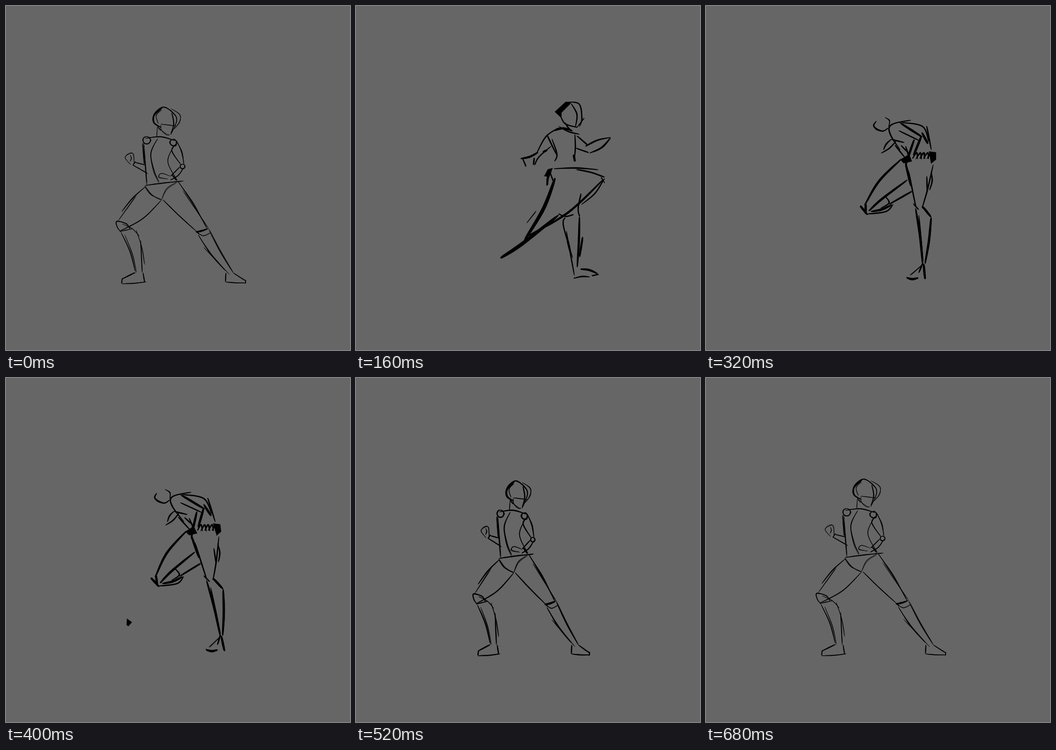
Animation, 748 px wide and 748 px high, one loop 880 ms. Source, as an HTML page with a canvas:

```html
<!DOCTYPE html>
<html lang="en">
<head>
<meta charset="utf-8">
<title>Spinning kick</title>
<style>
html, body { margin: 0; width: 100%; height: 100%; overflow: hidden; background: #666; }
canvas { display: block; width: 748px; height: 748px; }
</style>
</head>
<body>
<canvas id="stage" width="748" height="748"></canvas>
<script>
const FLOOR = 604, LOOP = 880;
let shapes, warp, weight, seed;

function random() {
  seed = seed * 16807 % 2147483647;
  return seed / 2147483647;
}

function spline(p) {
  const out = [];
  for (let i = 0; i < p.length - 1; i++) {
    const a = p[i - 1] || p[i], b = p[i], c = p[i + 1], d = p[i + 2] || c;
    for (let t = 0; t < 1; t += 0.125) {
      out.push([0, 1].map(k => b[k] + t / 2 * (c[k] - a[k] +
        t * (2 * a[k] - 5 * b[k] + 4 * c[k] - d[k] + t * (3 * (b[k] - c[k]) + d[k] - a[k])))));
    }
  }
  return [...out, p[p.length - 1]];
}

function addShape(pts) {
  const path = new Path2D();
  pts.forEach(([x, y]) => path.lineTo(x, y));
  path.closePath();
  shapes.push(path);
}

// A line that thins out towards both ends.
function brush(pts, width) {
  const mid = spline(pts), n = mid.length - 1, left = [], right = [];
  mid.forEach(([x, y], i) => {
    const a = mid[Math.max(0, i - 1)], b = mid[Math.min(n, i + 1)];
    const dx = b[0] - a[0], dy = b[1] - a[1], len = Math.hypot(dx, dy) || 1;
    const r = width / 2 * (0.3 + 0.7 * Math.sqrt(Math.max(0, Math.sin(Math.PI * i / n)))) / len;
    left.push([x - dy * r, y + dx * r]);
    right.unshift([x + dy * r, y - dx * r]);
  });
  addShape(left.concat(right));
}

const pairs = v => Array.from({ length: v.length >> 1 }, (_, i) => [v[2 * i], v[2 * i + 1]]);

// Takes x, y pairs; an odd last value bows the line to its right-hand side.
function stroke(size, v) {
  let pts = pairs(v);
  if (v.length % 2) {
    const [[x1, y1], [x2, y2]] = pts, bend = v[4] / Math.hypot(x2 - x1, y2 - y1);
    pts.splice(1, 0, [(x1 + x2) / 2 - (y2 - y1) * bend, (y1 + y2) / 2 + (x2 - x1) * bend]);
  }
  pts = pts.map(warp);
  brush(pts, size * weight);
  // A lighter second pass gives the sketchy double line.
  brush(pts.map(([x, y]) => [x + random() * 3 - 1.5, y + random() * 3 - 1.5]), size * weight * 0.5);
}

const fine = (...v) => stroke(0.65, v);
const line = (...v) => stroke(1, v);
const bold = (...v) => stroke(1.7, v);
const heavy = (...v) => stroke(2.8, v);
const blob = (...v) => addShape(pairs(v).map(warp));

function ring(cx, cy, rx, ry = rx) {
  const pts = Array.from({ length: 11 }, (_, i) =>
    [cx + rx * Math.cos(i * 0.66 - 2), cy + ry * Math.sin(i * 0.66 - 2)]);
  stroke(1.1, pts.flat());
}

function stanceBody() {
  bold(340, 221, 322, 238, 322, 254, 337, 264);
  line(322, 254, 322, 235, 342, 220, 364, 233, 371, 250, 358, 280);
  fine(358, 223, 378, 236, 377, 252, 365, 268);
  fine(338, 225, 331, 256, 8);
  fine(337, 257, 370, 261);
  line(360, 232, 359, 278, -5);
  fine(337, 258, 338, 270, 349, 280, 356, 280);
  line(329, 262, 337, 271);
  fine(329, 264, 328, 284);
  line(303, 288, 368, 293, -6);
  ring(306, 292, 8);
  ring(364, 297, 7);
  line(299, 297, 306, 389);
  line(297, 298, 301, 344);
  line(330, 288, 315, 320, 322, 358, 333, 383);
  fine(368, 300, 352, 338, 373, 380);
  line(303, 390, 386, 381, -1);
  line(302, 391, 338, 422, 5);
  fine(371, 383, 338, 421, 7);
}

function stanceArms() {
  line(371, 293, 387, 344, -3);
  line(366, 303, 361, 316, 380, 345);
  ring(384, 349, 5);
  line(386, 352, 357, 379, -4);
  line(378, 350, 358, 370);
  fine(357, 370, 338, 364, 333, 372, 352, 376);
  line(360, 366, 371, 380);
  fine(271, 345, 259, 330, 267, 322, 277, 322, 279, 343);
  fine(270, 324, 270, 338, -3);
  line(276, 347, 281, 338);
  line(281, 340, 304, 346);
  line(276, 346, 308, 364);
}

function stanceLegs() {
  line(303, 393, 252, 447, 3);
  fine(284, 412, 244, 467);
  line(338, 422, 247, 490, -8);
  line(270, 486, 262, 474, 241, 468, 242, 481, 250, 491);
  fine(247, 490, 276, 484);
  fine(253, 474, 290, 500, -4);
  line(250, 492, 281, 577, -4);
  fine(258, 497, 284, 580, -3);
  fine(283, 487, 301, 562, -3);
  line(293, 510, 296, 580);
  line(281, 579, 251, 594);
  line(253, 592, 251, 603);
  line(251, 604, 305, 600, 1);
  line(298, 580, 301, 600);
}

function stanceBackLeg() {
  line(374, 381, 437, 483, -2);
  fine(385, 402, 442, 486);
  line(341, 421, 414, 490, 1);
  bold(413, 492, 439, 484, 1);
  fine(415, 492, 444, 493, 7);
  line(413, 489, 420, 496);
  line(418, 498, 477, 575, 3);
  fine(430, 525, 486, 584);
  line(441, 486, 494, 580, 2);
  line(478, 580, 477, 600);
  line(477, 600, 521, 602, 1);
  line(494, 580, 521, 598);
  line(521, 596, 521, 603);
}

function stance() {
  stanceBody();
  stanceArms();
  stanceLegs();
  stanceBackLeg();
}

function stepBody() {
  blob(432, 230, 456, 208, 468, 211, 447, 232, 447, 244);
  line(456, 209, 485, 213, 491, 245, 486, 262);
  line(445, 240, 455, 256, 480, 264);
  line(468, 212, 477, 263, -8);
  fine(496, 243, 480, 265);
  bold(430, 271, 470, 271, -5);
  line(441, 262, 486, 279, 3);
  line(455, 254, 470, 272, 2);
  line(441, 265, 413, 284, 392, 322);
  line(415, 281, 438, 327);
  line(426, 289, 437, 322, 432, 338);
  line(476, 279, 474, 338, -2);
  bold(473, 323, 476, 338);
}

function stepArms() {
  line(424, 305, 398, 328, 388, 346);
  bold(358, 332, 396, 318, 3);
  line(362, 331, 370, 349);
  line(388, 330, 386, 346);
  bold(406, 318, 416, 313);
  line(480, 282, 504, 302);
  line(498, 305, 553, 286, -4);
  line(554, 287, 508, 320, -6);
  line(478, 309, 506, 319);
}

function stepLegs() {
  line(430, 354, 527, 356, -3);
  line(480, 355, 541, 372, -2);
  fine(533, 372, 541, 385);
  blob(409, 370, 417, 355, 428, 352, 420, 372);
  bold(424, 360, 416, 390, 3);
  line(422, 362, 430, 384);
  heavy(433, 374, 408, 440, 366, 510);
  heavy(314, 548, 360, 518, 440, 455);
  bold(370, 502, 460, 450, 537, 378);
  line(540, 375, 490, 432, -6);
  fine(371, 472, 392, 446);
  line(489, 407, 483, 440, 486, 458);
  line(440, 452, 473, 453, 5);
  line(455, 460, 451, 478, 471, 548);
  bold(459, 505, 466, 535);
  line(457, 490, 475, 586);
  bold(486, 458, 481, 568, -1);
  bold(493, 502, 486, 545);
  line(473, 592, 508, 589, -2);
  bold(488, 572, 525, 582, -3);
  line(513, 587, 528, 583);
}

function step() {
  stepBody();
  stepArms();
  stepLegs();
}

function kickBody() {
  line(442, 187, 418, 202, 420, 222, 438, 230);
  fine(409, 205, 437, 234, 8);
  fine(440, 191, 428, 205, 435, 222);
  fine(447, 195, 467, 196, 470, 207);
  line(469, 207, 454, 240);
  fine(383, 278, 405, 244, -3);
  bold(408, 253, 388, 290, 376, 332);
  bold(399, 262, 383, 302);
  line(430, 249, 413, 275, 408, 305);
  line(443, 250, 446, 270, 402, 318, 380, 347);
  line(457, 250, 465, 282);
  line(413, 285, 476, 290, -6);
  line(410, 307, 470, 293);
  heavy(466, 296, 488, 296);
  line(376, 347, 410, 322);
  line(376, 346, 418, 396);
  line(384, 341, 407, 353, 412, 390);
}

function kickSweep() {
  line(505, 332, 558, 332);
  line(550, 335, 533, 370, -3);
  heavy(460, 437, 520, 392, 548, 352);
  bold(489, 299, 580, 283, 697, 298);
  line(693, 296, 635, 353, 558, 403);
  heavy(361, 499, 435, 470, 514, 432);
  heavy(388, 486, 465, 445);
  line(452, 480, 468, 460);
  line(468, 455, 495, 448, 4);
  bold(484, 474, 500, 474);
}

function kickLeg() {
  heavy(424, 313, 457, 346, 466, 372);
  bold(463, 358, 471, 430);
  line(467, 380, 466, 435);
  line(476, 305, 460, 350);
  fine(485, 297, 514, 320, -4);
  line(508, 306, 519, 326);
  line(511, 328, 511, 390);
  bold(500, 404, 508, 398);
  fine(470, 480, 470, 508, 6);
  bold(473, 478, 475, 520, 485, 580);
  bold(504, 458, 489, 570);
  line(497, 458, 488, 545);
  line(473, 572, 470, 595, 480, 598);
  bold(472, 596, 515, 588, 4);
  line(490, 576, 516, 577);
  line(516, 577, 506, 588, 514, 590);
  line(494, 577, 492, 595);
}

function kick() {
  kickBody();
  kickSweep();
  kickLeg();
}

function foldBody() {
  line(328, 250, 324, 262, 343, 272, 356, 265);
  line(322, 258, 340, 272, 3);
  fine(346, 242, 356, 263, -6);
  line(402, 248, 362, 258, 361, 278, 387, 313);
  line(383, 253, 430, 262, 447, 295);
  bold(380, 254, 432, 285);
  line(379, 271, 425, 292);
  line(439, 261, 455, 313);
  bold(430, 275, 446, 300);
  line(365, 290, 351, 313, 3);
  line(376, 294, 347, 320, -3);
  line(365, 290, 394, 297);
  line(374, 302, 400, 330);
  line(388, 303, 404, 318);
  blob(390, 334, 408, 322, 416, 338, 398, 342);
  line(398, 305, 403, 350, -6);
  bold(415, 290, 404, 340);
  bold(430, 283, 418, 325);
  for (let x = 416; x < 450; x += 8) line(x, 332, x + 8, 319, x + 11, 333);
  blob(450, 316, 466, 318, 468, 334, 458, 343);
}

function foldLegs() {
  bold(393, 332, 350, 380, 325, 432);
  bold(315, 434, 333, 454);
  bold(326, 428, 329, 452);
  bold(411, 378, 360, 420, 335, 446);
  line(332, 452, 372, 447, 386, 432);
  line(377, 431, 424, 402);
  line(367, 414, 377, 428, 360, 440);
  bold(340, 447, 384, 432, 3);
  bold(402, 340, 420, 392);
  line(411, 358, 436, 437);
  bold(436, 440, 466, 562, -2);
  line(445, 455, 466, 555);
  line(463, 345, 457, 400, 450, 440);
  line(452, 370, 457, 405);
  line(460, 360, 462, 400, -4);
  line(430, 430, 443, 443);
  bold(450, 435, 472, 459);
  bold(472, 460, 471, 560, -2);
  fine(466, 562, 442, 586);
  bold(435, 591, 460, 591, 3);
  line(466, 560, 460, 580);
  bold(468, 560, 475, 594);
}

function fold() {
  foldBody();
  foldLegs();
}

function foldWithBlot() {
  fold();
  blob(263, 523, 274, 531, 266, 540, 262, 537);
}

function landBody() {
  bold(300, 296, 355, 294, -3);
  line(297, 290, 297, 300);
  line(299, 295, 277, 335, 240, 374);
  line(290, 340, 240, 384, -2);
  line(241, 374, 220, 384, 228, 390, 242, 376);
  line(306, 297, 301, 345, -2);
  bold(296, 357, 300, 364);
  line(330, 296, 321, 340, 329, 415);
  line(341, 296, 336, 315);
  bold(350, 315, 346, 353, 3);
  line(353, 295, 350, 340, 370, 385);
  line(354, 295, 358, 325, 371, 342);
  line(360, 296, 379, 340, -4);
  ring(375, 349, 10, 8);
  fine(304, 363, 292, 395);
  bold(293, 393, 328, 417, 6);
  line(358, 388, 331, 418, 2);
}

function landLegs() {
  line(292, 397, 287, 445, 313, 492);
  line(329, 418, 330, 475, -1);
  fine(297, 435, 296, 450);
  ring(319, 482, 9, 10);
  line(306, 487, 328, 488, 7);
  line(304, 487, 283, 510, 286, 567);
  bold(283, 500, 275, 540);
  line(327, 490, 290, 566, -5);
  line(288, 568, 277, 597);
  bold(272, 597, 308, 597, 2);
  bold(293, 562, 306, 594);
  fine(298, 570, 313, 588);
}

function landBackLeg() {
  bold(366, 385, 430, 476);
  line(331, 419, 412, 487, 3);
  bold(333, 422, 354, 445);
  line(345, 447, 358, 444);
  bold(411, 487, 432, 476);
  line(412, 486, 416, 499, 3);
  line(413, 492, 466, 570, 2);
  line(430, 478, 477, 560);
  fine(440, 472, 470, 545);
  line(466, 570, 455, 597);
  line(455, 598, 482, 597);
  bold(472, 570, 488, 590);
  bold(488, 590, 480, 598);
  fine(373, 478, 379, 478);
  fine(448, 404, 451, 400);
}

function land() {
  landBody();
  landLegs();
  landBackLeg();
}

const still = p => p;
const lean = k => ([x, y]) => [x + (FLOOR - y) * k, y];
const stretch = (sy, sx = 1) => ([x, y]) => [388 + (x - 388) * sx, FLOOR + (y - FLOOR) * sy];

function pose(sketch, size, change = still) {
  shapes = [];
  warp = change;
  weight = size;
  seed = 7;
  sketch();
  return shapes;
}

const ready = pose(stance, 2);
const timeline = [
  [0, ready],
  [80, pose(stance, 2.6, lean(0.15))],
  [160, pose(step, 2.8)],
  [240, pose(kick, 2.7)],
  [320, pose(fold, 3, lean(0.12))],
  [400, pose(foldWithBlot, 3)],
  [480, pose(land, 2.7)],
  [520, pose(stance, 2.6, stretch(0.99, 0.9))],
  [560, pose(stance, 2.2, stretch(1.03, 0.96))],
  [600, pose(stance, 1.8, stretch(1.0208))],
  [680, ready]
];

const ctx = document.getElementById("stage").getContext("2d");
let shown;

function draw() {
  const t = performance.now() % LOOP;
  const current = timeline.filter(([start]) => start <= t).pop()[1];
  if (current !== shown) {
    ctx.fillStyle = "#666";
    ctx.fillRect(0, 0, 748, 748);
    ctx.fillStyle = "#000";
    current.forEach(path => ctx.fill(path));
    shown = current;
  }
  requestAnimationFrame(draw);
}
draw();
</script>
</body>
</html>
```
